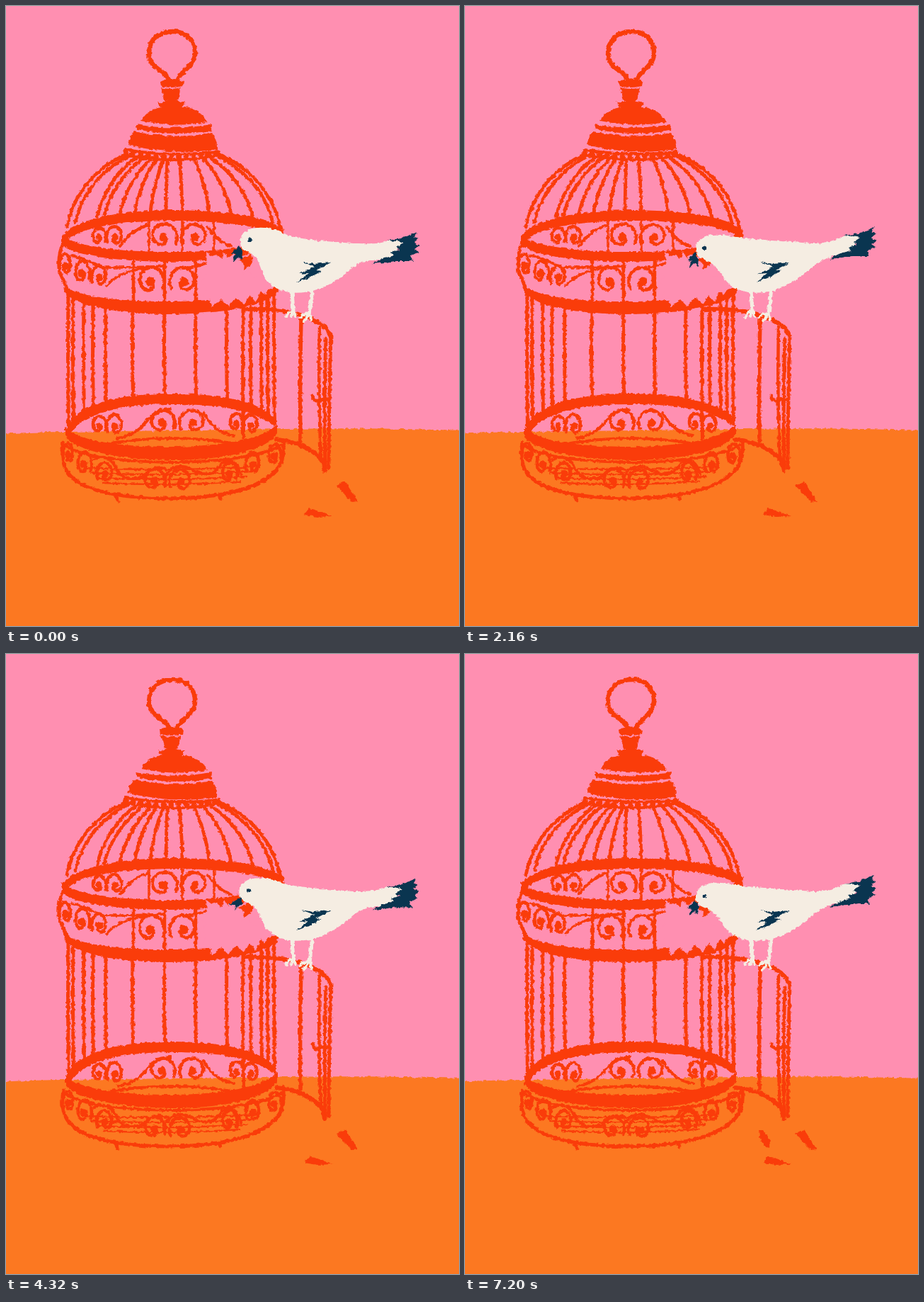
Animation of 640x875 px, one loop 7320 ms. Source, as an HTML page:

```html
<!DOCTYPE html>
<html lang="en">
<head>
<meta charset="utf-8">
<title>Bird and cage</title>
<style>
  html, body { margin: 0; width: 100%; height: 100%; overflow: hidden; background: #ff8fb1; }
  svg { display: block; width: 100%; height: 100%; }
  .line { fill: none; stroke: #fa3c0a; stroke-linecap: round; stroke-linejoin: round; }
  .red { fill: #fa3c0a; }
  .pink { fill: #ff8fb1; }
  .white { fill: #f5ede2; }
  .navy { fill: #0a3550; }
</style>
</head>
<body>
<svg viewBox="0 0 640 875" preserveAspectRatio="none">
  <defs>
    <filter id="rough" filterUnits="userSpaceOnUse" x="-10" y="0" width="660" height="885" color-interpolation-filters="sRGB">
      <feTurbulence id="noise" type="fractalNoise" baseFrequency=".2" numOctaves="2" result="n"/>
      <feDisplacementMap in="SourceGraphic" in2="n" scale="5" xChannelSelector="R" yChannelSelector="G"/>
    </filter>
  </defs>
  <rect width="640" height="875" class="pink"/>
  <g filter="url(#rough)">
    <path fill="#fc7821" d="M-10 604 Q40 601 85 601 L330 598 Q480 595 560 597 L650 599 V890 H-10Z"/>
    <g id="cage"></g>
    <path class="pink" d="M283 347 L291 353 L297 351 L304 357 L308 347 L313 355 L322 349 L328 362 L335 366 L333 378 L341 372 L348 382 L372 384 L384 396 L371 400 L366 408 L360 402 L353 418 L344 408 L336 421 L325 411 L314 424 L304 414 L290 425 L288 411 L278 409 L284 398 L275 389 L284 381 L272 374 L284 368Z"/>
    <path class="red" d="M328 358 L347 350 L349 362 L336 373 L337 364Z"/>
    <path class="red" d="M467 677 L479 671 L497 699 L489 700 L475 686Z M421 718 L428 709 L440 712 L461 720 L440 721Z"/>
    <path id="chip" class="red" d="M415 671 L420 671 L432 688 L431 696 L424 695 L416 682Z"/>
    <path fill="none" stroke="#f5ede2" stroke-width="5" stroke-linecap="round" d="M404 402 L406 431 M433 398 L429 435"/>
    <path fill="none" stroke="#f5ede2" stroke-width="4" stroke-linecap="round" d="M406 431 Q397 431 396 439 M405 432 L403 438 M407 432 L409 438 M429 435 Q418 433 416 440 M427 436 L421 445 M430 436 L431 443"/>
    <path id="body" class="white"/>
    <path id="tail" class="navy" d="M535 324 L556 321 L578 312 L574 319 L580 321 L573 327 L582 331 L574 336 L580 340 L568 346 L572 353 L548 353 L515 357 L528 350 L545 345 L541 341 L553 337 L549 333 L558 327 L549 325Z"/>
    <path class="navy" d="M417 361 L434 364 L459 362 L438 373 L446 374 L430 383 L411 390 L427 377 L414 378 L436 368Z"/>
    <path id="beak" class="navy"/>
    <circle id="eye" class="navy" r="2.7"/>
  </g>
</svg>
<script>
const LOOP = 7320, STEP = 360;
const $ = id => document.getElementById(id);
const parts = [];
const line = (d, w = 5) => parts.push(`<path class="line" stroke-width="${w}" d="${d}"/>`);
const fill = (d, cls = 'red') => parts.push(`<path class="${cls}" d="${d}"/>`);
const dot = (x, y, r) => parts.push(`<circle class="red" cx="${x}" cy="${y}" r="${r}"/>`);

// Spiral curl that ends in a dot; dir mirrors it, squash narrows it near the rim.
function curl(cx, cy, r, dir = 1, squash = 1, w = 4.5) {
  let d = '';
  for (let i = 0; i <= 22; i++) {
    const a = 3.6 - i * .28, k = r * (1 - .72 * (i / 22) ** 2);
    d += `${i ? 'L' : 'M'}${(cx + dir * squash * k * Math.cos(a)).toFixed(1)} ${(cy - k * Math.sin(a)).toFixed(1)}`;
  }
  line(d, w);
  dot(cx, cy, r * .3);
}

function drawCrown() {
  line('M230 104 C227 92 202 88 202 68 C202 48 216 36 236 36 C256 36 268 50 267 68 C266 85 247 92 242 104', 6.5);
  fill('M217 107 Q234 98 251 107 L250 113 Q234 117 218 113Z M219 115 Q234 119 247 115 L243 133 Q234 136 224 133Z');
  fill('M214 135 Q219 138 226 134 H243 Q249 138 253 135 Q250 145 241 146 H226 Q217 144 214 135Z');
  fill('M191 162 C198 149 211 143 222 143 H249 C265 143 278 151 285 164 Q238 172 191 162Z');
  fill('M183 167 Q237 176 291 167 L290 176 Q237 185 185 174Z');
  fill('M181 177 Q237 189 291 179 Q299 189 298 202 Q236 212 172 196 Q174 184 181 177Z');
  line('M169 203 Q234 213 300 206', 4);
  line('M167 210 Q234 224 300 211', 4);
  for (let i = 0; i < 13; i++) dot(169 + i * 10.7, 207 + 6 * Math.sin(Math.PI * i / 12), 3.8);
}

function drawRibs() {
  const rows = [[170, 86, 312], [177, 98, 305], [188, 129, 297], [197, 139, 295], [207, 161, 293],
    [214, 182, 292], [223, 204, 292], [228, 226, 292], [245, 249, 292], [264, 287, 292],
    [275, 318, 294], [284, 349, 299], [294, 377, 306], [300, 388, 315]];
  for (const [x, end, y] of rows) {
    const dx = end - x, y0 = 218 - Math.abs(x - 235) / 7;
    line(`M${x} ${y0} C${x + dx * .45} ${y0 + 17} ${end - dx * .13} ${y0 + 50} ${end} ${y}`, 4.8);
  }
}

function drawBars() {
  const rows = [[88, 405, 600], [95, 410, 592], [110, 414, 578], [123, 418, 572], [141, 422, 566],
    [179, 428, 552], [224, 430, 550], [268, 430, 550], [312, 428, 554], [335, 425, 610],
    [346, 425, 572], [361, 412, 576], [370, 408, 582], [379, 400, 590]];
  for (const [x, y1, y2] of rows) line(`M${x} ${y1} Q${x - 1} ${(y1 + y2) / 2} ${x + .5} ${y2}`, 5);
}

function drawMiddle() {
  for (const x of [202, 249, 294]) line(`M${x} 303 V346`, 3.5);
  for (const x of [180, 224, 268]) line(`M${x} 360 V418`, 4.5);
  curl(131, 326, 14, -1, .75); curl(154, 326, 16, 1, .75);
  curl(222, 326, 20, -1); curl(267, 326, 19, 1);
  line('M161 339 Q179 315 199 310 M285 312 Q302 335 318 339', 4);
  curl(84, 367, 18, 1, .5); curl(107, 377, 19, -1, .6); curl(132, 383, 18, 1, .62);
  curl(204, 389, 22, -1, .9); curl(251, 389, 22, 1, .9);
  line('M92 352 Q120 358 140 373 M142 395 Q157 376 196 370 M140 369 Q184 369 225 367 M260 369 L284 363', 3.5);
  fill('M79 326 C90 305 150 288 235 288 C320 288 380 300 393 318 L388 326 C370 312 310 303 235 303 C160 304 105 312 88 330Z');
  fill('M79 322 C90 338 160 347 225 347 C300 348 370 340 393 314 L391 326 C375 350 300 361 228 361 C150 360 90 351 79 336Z');
  fill('M84 394 C95 408 150 417 225 417 C300 417 365 409 384 390 L385 402 C370 425 300 435 225 435 C150 434 95 422 82 402Z');
  line('M81 334 Q72 354 76 376 Q82 388 86 399 M390 322 Q392 360 383 396', 5);
}

function drawBase() {
  curl(131, 592, 14, -1, .75); curl(154, 593, 18, 1, .65);
  curl(220, 588, 19, -1); curl(264, 588, 19, 1);
  curl(325, 589, 15, -1, .7); curl(346, 592, 16, 1, .7);
  line('M158 610 Q183 606 198 587 Q212 570 232 569 M279 574 Q294 602 322 606', 4);
  line('M132 620 Q235 600 335 620', 4);
  fill('M85 602 C88 570 140 547 235 547 C320 547 375 565 382 588 L376 591 C350 570 300 562 235 562 C160 562 110 575 92 602Z');
  fill('M84 594 C100 614 160 622 235 622 C310 621 365 611 383 590 L383 604 C365 630 300 641 235 641 C150 640 95 625 84 608Z');
  line('M81 616 Q76 648 91 663 Q120 694 230 695 Q346 694 382 655 Q394 642 392 618', 5);
  line('M82 619 Q112 642 230 644 Q352 643 392 618', 4);
  for (let i = 0; i < 4; i++) line(`M${112 + i * 8} ${652 + i * 7} Q230 ${657 + i * 7} ${358 - i * 9} ${650 + i * 7}`, 2.3);
  curl(88, 633, 17, 1, .48); curl(110, 647, 19, -1, .58); curl(140, 660, 17, 1, .7);
  curl(209, 670, 18, -1, .9); curl(247, 671, 18, 1, .9);
  curl(315, 660, 17, -1, .7); curl(349, 647, 18, 1, .58); curl(379, 635, 18, -1, .55);
  line('M124 640 Q144 630 155 651 Q165 674 194 664 Q207 646 226 654 M226 661 Q238 645 258 652 Q290 672 305 645 Q325 634 332 661', 4);
  line('M155 692 L158 698 M301 691 L303 695', 5);
}

function drawDoor() {
  line('M337 428 Q378 427 405 433 Q449 443 458 465', 6);
  line('M417 441 Q415 525 416 614', 5.5);
  line('M443 454 Q441 560 445 636', 4.5);
  line('M452 470 Q449 560 451 655 M459 465 Q456 560 456 652', 5);
  line('M382 612 Q424 616 447 641 L450 656', 6);
  line('M433 550 Q435 560 443 556 L454 555', 5);
}

drawRibs(); drawBars(); drawMiddle(); drawBase(); drawDoor(); drawCrown();
$('cage').innerHTML = parts.join('');

// Head lift at each step: 0 is bent to the cage, 1 is raised.
const lifts = { 0: 1, 1: .5, 12: .65, 13: 1, 14: .5 };

function pose(step) {
  const lift = lifts[step] || 0;
  const hx = 5 * lift, hy = -10 * lift, ty = 7 * lift, tx = 3 * lift;
  const head = (x, y) => `${x + hx} ${y + hy}`;
  const tail = (x, y) => `${x + tx} ${y + ty}`;
  $('body').setAttribute('d',
    `M${head(326, 343)} C${head(327, 328)} ${head(340, 323)} ${head(352, 323)}
     C${head(366, 322)} ${head(378, 326)} ${398 + hx / 2} ${328 + hy / 3}
     C430 331 465 333 491 335 C510 335 526 ${330 + ty} ${tail(537, 324)}
     L${tail(549, 323)} L${tail(558, 326)} L${tail(545, 345)} L${tail(528, 351)} C513 ${354 + ty / 2} 500 361 490 369
     C475 383 456 396 434 402 C406 408 383 404 369 388
     C357 371 ${head(354, 365)} ${head(341, 359)} C${head(331, 356)} ${head(326, 351)} ${head(326, 343)}Z`);
  $('tail').setAttribute('transform', `translate(${tx} ${ty})`);
  const beak = step === 12
    ? 'M329 349 L313 359 L321 360 L321 367 L331 357Z'
    : 'M325 347 L314 359 L321 360 L317 364 L318 370 L324 363 L329 368 L330 357Z';
  $('beak').setAttribute('d', beak);
  $('beak').setAttribute('transform', `translate(${hx * .8} ${hy * .9})`);
  $('eye').setAttribute('cx', 338.5 + hx * 1.3);
  $('eye').setAttribute('cy', 341.5 + hy * 1.15);
  $('chip').style.display = step >= 14 ? '' : 'none';
  $('noise').setAttribute('seed', step + 3);
}

let shown = -1;
function tick() {
  const step = Math.floor(performance.now() % LOOP / STEP);
  if (step !== shown) pose(shown = step);
  requestAnimationFrame(tick);
}
tick();
</script>
</body>
</html>
```
